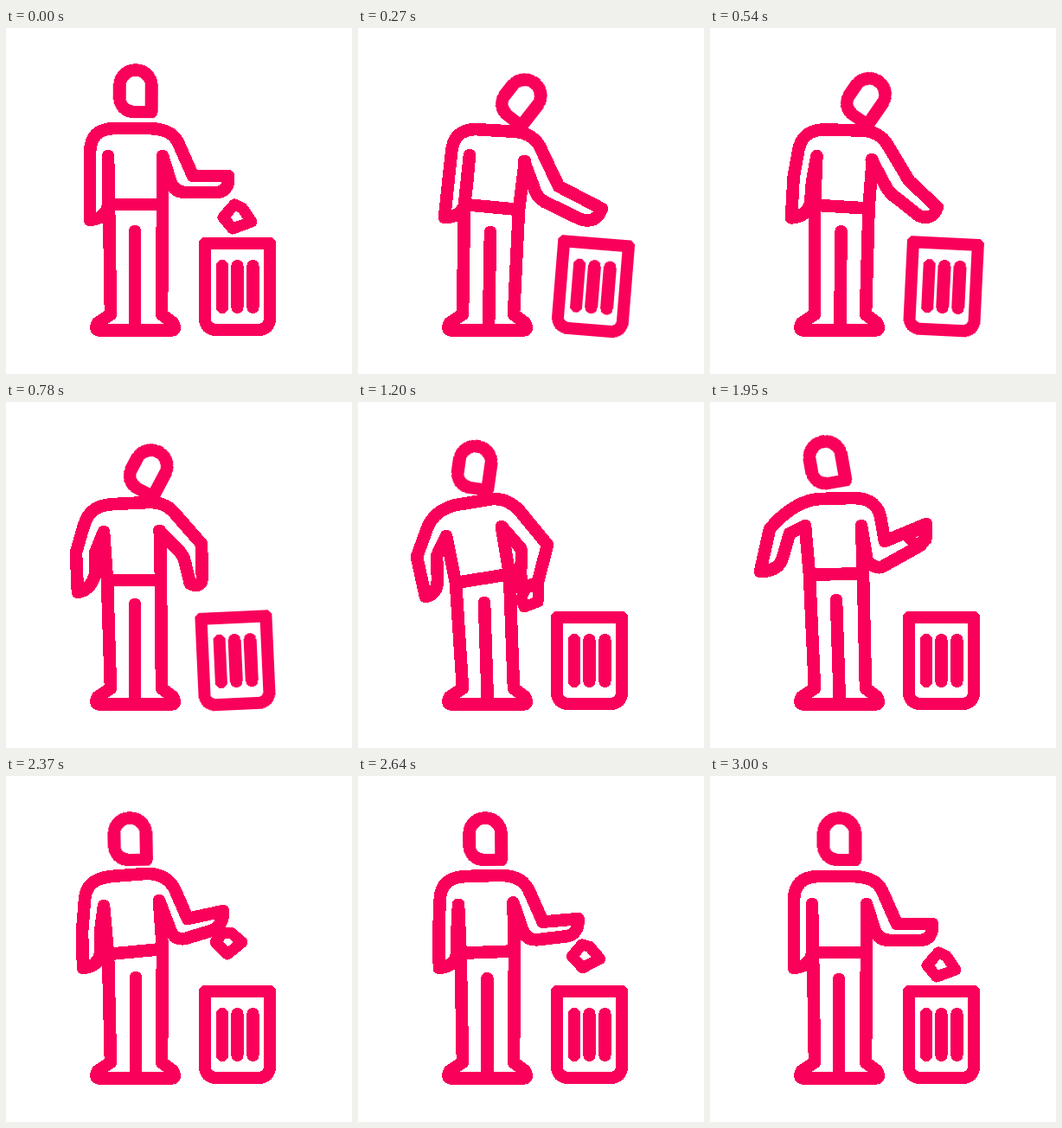
An HTML page without scripts that plays this animation: 400x400 px, repeating every 5.59 s.

```html
<!DOCTYPE html>
<html lang="en">
<head>
<meta charset="utf-8">
<title>Keep it tidy</title>
<style>
html, body { margin: 0; width: 100%; height: 100%; overflow: hidden; background: #fff; }
svg { display: block; width: 100vw; height: 100vh; }
.ink { fill: none; stroke: #f9005b; stroke-width: 14.6; stroke-linecap: round; stroke-linejoin: round; shape-rendering: crispEdges; }
.move { animation: 5590ms linear infinite; }

/* Poses: drop 0, lean 4.83, stand 13.95, pocket 21.47, raise 34.88, offer 42.4, rest 53.67 */
#head { animation-name: head; }
#arm-l { animation-name: arm-l; }
#shoulders { animation-name: shoulders; }
#arm-r { animation-name: arm-r; }
#trunk { animation-name: trunk; }
#legs { animation-name: legs; }
#paper { animation-name: paper, fall, show; stroke-width: 13; }
#bin { animation-name: bin; transform-origin: 267.5px 349px; stroke-width: 14.2; }

@keyframes head {
  0% { transform: translate(149.5px, 73px) rotate(0deg); animation-timing-function: ease-out; }
  4.83% { transform: translate(189px, 83px) rotate(38deg); animation-timing-function: ease-in; }
  13.95% { transform: translate(165px, 79.5px) rotate(28deg); animation-timing-function: ease-out; }
  21.47% { transform: translate(134.7px, 75.5px) rotate(8deg); animation-timing-function: ease-in-out; }
  34.88% { transform: translate(134.5px, 70px) rotate(-10deg); animation-timing-function: ease-in-out; }
  42.4% { transform: translate(143.5px, 73px) rotate(-1deg); animation-timing-function: ease-out; }
  53.67%, 100% { transform: translate(149.5px, 73px) rotate(0deg); }
}
@keyframes arm-l {
  0% { d: path("M118 148 L118 180 L118 205 Q116 220 97 222 L97 175 L97 145 C97 124 108 116 127 116"); animation-timing-function: ease-out; }
  4.83% { d: path("M129 147 L126 180 L123 205 Q118 219 100 219 L105 172 L108 145 C109 127 118 118 135 117"); animation-timing-function: ease-in; }
  13.95% { d: path("M113 150 L103 175 L103 200 Q97 218 83 220 L81 174 L90 143 C95 126 105 119 125 118"); animation-timing-function: ease-out; }
  21.47% { d: path("M102 155 L91 178 L92 205 Q92 222 78 225 L68 179 L80 146 C86 130 98 123 113 119"); animation-timing-function: ease-in-out; }
  34.88% { d: path("M110 143 L92 152 L84 180 Q79 196 58 196 L69 147 L76 139 C93 122 110 113 127 112"); animation-timing-function: ease-in-out; }
  42.4% { d: path("M113 150 L109 180 L109 205 Q107 220 89 222 L88 180 L91 143 C92 126 103 118 122 116"); animation-timing-function: ease-out; }
  53.67%, 100% { d: path("M118 148 L118 180 L118 205 Q116 220 97 222 L97 175 L97 145 C97 124 108 116 127 116"); }
}
@keyframes shoulders {
  0% { d: path("M127 116 L166 116 C188 117 196 124 201 137"); animation-timing-function: ease-out; }
  4.83% { d: path("M135 117 L184 120 C203 123 209 133 213 143"); animation-timing-function: ease-in; }
  13.95% { d: path("M125 118 L165 116 C182 116 190 122 198 132"); animation-timing-function: ease-out; }
  21.47% { d: path("M113 119 L156 112 C170 112 178 117 186 125"); animation-timing-function: ease-in-out; }
  34.88% { d: path("M127 112 L165 111 C188 111 196 122 198 138"); animation-timing-function: ease-in-out; }
  42.4% { d: path("M122 116 L160 113 C182 112 191 122 196 133"); animation-timing-function: ease-out; }
  53.67%, 100% { d: path("M127 116 L166 116 C188 117 196 124 201 137"); }
}
@keyframes arm-r {
  0% { d: path("M201 137 L216 171 L257 171 Q258 190 242 190 L208 190 Q194 190 190 177 L181 148"); animation-timing-function: ease-out; }
  4.83% { d: path("M213 143 L232 183 L282 209 Q275 227 257 221 L222 204 Q209 199 205 189 L192 154"); animation-timing-function: ease-in; }
  13.95% { d: path("M198 132 L226 164 L227 204 Q225 216 213 210 L207 185 Q205 177 200 172 L177 149"); animation-timing-function: ease-out; }
  21.47% { d: path("M186 125 L219 165 L208 208 Q205 210 189 216 L188 196 Q190 173 188 169 L166 144"); animation-timing-function: ease-in; }
  28.98% { d: path("M194 134 L208 160 L254 160 Q256 176 245 182 L205 192 Q193 190 183 180 L172 143"); animation-timing-function: ease-out; }
  34.88% { d: path("M198 138 L202 161 L250 141 Q251 158 243 166 L200 190 Q194 194 182 185 L175 143"); animation-timing-function: ease-in-out; }
  42.4% { d: path("M196 133 L210 165 L251 156 Q251 172 240 178 L207 188 Q194 190 190 178 L177 144"); animation-timing-function: ease-out; }
  53.67%, 100% { d: path("M201 137 L216 171 L257 171 Q258 190 242 190 L208 190 Q194 190 190 177 L181 148"); }
}
@keyframes trunk {
  0% { d: path("M118 148 L119 204 L181 204 L181 148"); animation-timing-function: ease-out; }
  4.83% { d: path("M129 147 L123 204 L186 210 L193 154"); animation-timing-function: ease-in; }
  13.95% { d: path("M113 150 L117 206 L179 206 L178 149"); animation-timing-function: ease-out; }
  21.47% { d: path("M102 155 L113 209 L175 199 L166 144"); animation-timing-function: ease-in-out; }
  34.88% { d: path("M110 143 L115 200 L177 198 L175 143"); animation-timing-function: ease-in-out; }
  42.4% { d: path("M113 150 L118 206 L181 200 L177 145"); animation-timing-function: ease-out; }
  53.67%, 100% { d: path("M118 148 L119 204 L181 204 L181 148"); }
}
@keyframes legs {
  0% { d: path("M119 204 L121 331 M181 204 L180 331 M149 235 L149 349"); animation-timing-function: ease-out; }
  4.83% { d: path("M123 204 L121 331 M186 210 L180 331 M153 236 L151 349"); animation-timing-function: ease-in; }
  13.95% { d: path("M117 206 L121 331 M179 206 L180 331 M149 234 L149 349"); animation-timing-function: ease-out; }
  21.47% { d: path("M113 209 L121 331 M175 199 L180 331 M146 232 L150 349"); animation-timing-function: ease-in-out; }
  34.88% { d: path("M115 200 L121 331 M177 198 L180 331 M146 229 L150 349"); animation-timing-function: ease-in-out; }
  42.4% { d: path("M118 206 L121 331 M181 200 L180 331 M150 233 L150 349"); animation-timing-function: ease-out; }
  53.67%, 100% { d: path("M119 204 L121 331 M181 204 L180 331 M149 235 L149 349"); }
}
@keyframes paper {
  0%, 10% { d: path("M251 219 L264 204 L273 208 L284 224 L262 232 Z"); }
  10.01%, 21.47% { d: path("M189 227 L193 216 L208 210 L208 231 L192 237 Z"); animation-timing-function: ease-in; }
  28.98% { d: path("M233 176 L242 169 L255 163 L258 180 L243 187 Z"); animation-timing-function: ease-out; }
  34.88% { d: path("M228 155 L238 149 L250 142 L250 159 L237 165 Z"); animation-timing-function: ease-in-out; }
  42.4% { d: path("M242 192 L251 181 L260 181 L273 192 L256 206 Z"); animation-timing-function: ease-out; }
  53.67%, 100% { d: path("M251 219 L264 204 L273 208 L284 224 L262 232 Z"); }
}
@keyframes fall {
  0% { transform: translateY(0); animation-timing-function: ease-in; }
  4.3%, 10% { transform: translateY(75px); }
  10.01%, 100% { transform: translateY(0); }
}
@keyframes show {
  0%, 4.3% { visibility: visible; }
  4.31%, 19.3% { visibility: hidden; }
  19.31%, 100% { visibility: visible; }
}
@keyframes bin {
  0%, 1.6% { transform: rotate(0deg); }
  4.83% { transform: rotate(4.6deg); animation-timing-function: ease-out; }
  6.4% { transform: rotate(6.2deg); animation-timing-function: ease-in-out; }
  13.95% { transform: rotate(-2.6deg); animation-timing-function: ease-in-out; }
  19.9%, 100% { transform: rotate(0deg); }
}
</style>
</head>
<body>
<svg viewBox="0 0 400 400">
  <g class="ink">
    <path id="paper" class="move" d="M251 219 L264 204 L273 208 L284 224 L262 232 Z"/>
    <g id="bin" class="move">
      <path fill="#fff" d="M230 249H305V335Q305 349 291 349H244Q230 349 230 335Z"/>
      <path d="M250 275V323M267.5 275V323M285.5 275V323"/>
    </g>
    <path d="M121 331L106 341Q102 349.4 108 349.4H192Q197 349.4 193 341L180 331"/>
    <path id="legs" class="move"/>
    <path id="trunk" class="move"/>
    <path id="arm-l" class="move"/>
    <path id="shoulders" class="move"/>
    <path id="arm-r" class="move"/>
    <path id="head" class="move" d="M18.5 24H0C-12 24 -18.5 17 -18.5 6V-6A18.5 18.5 0 0 1 18.5 -6Z"/>
  </g>
</svg>
</body>
</html>
```
